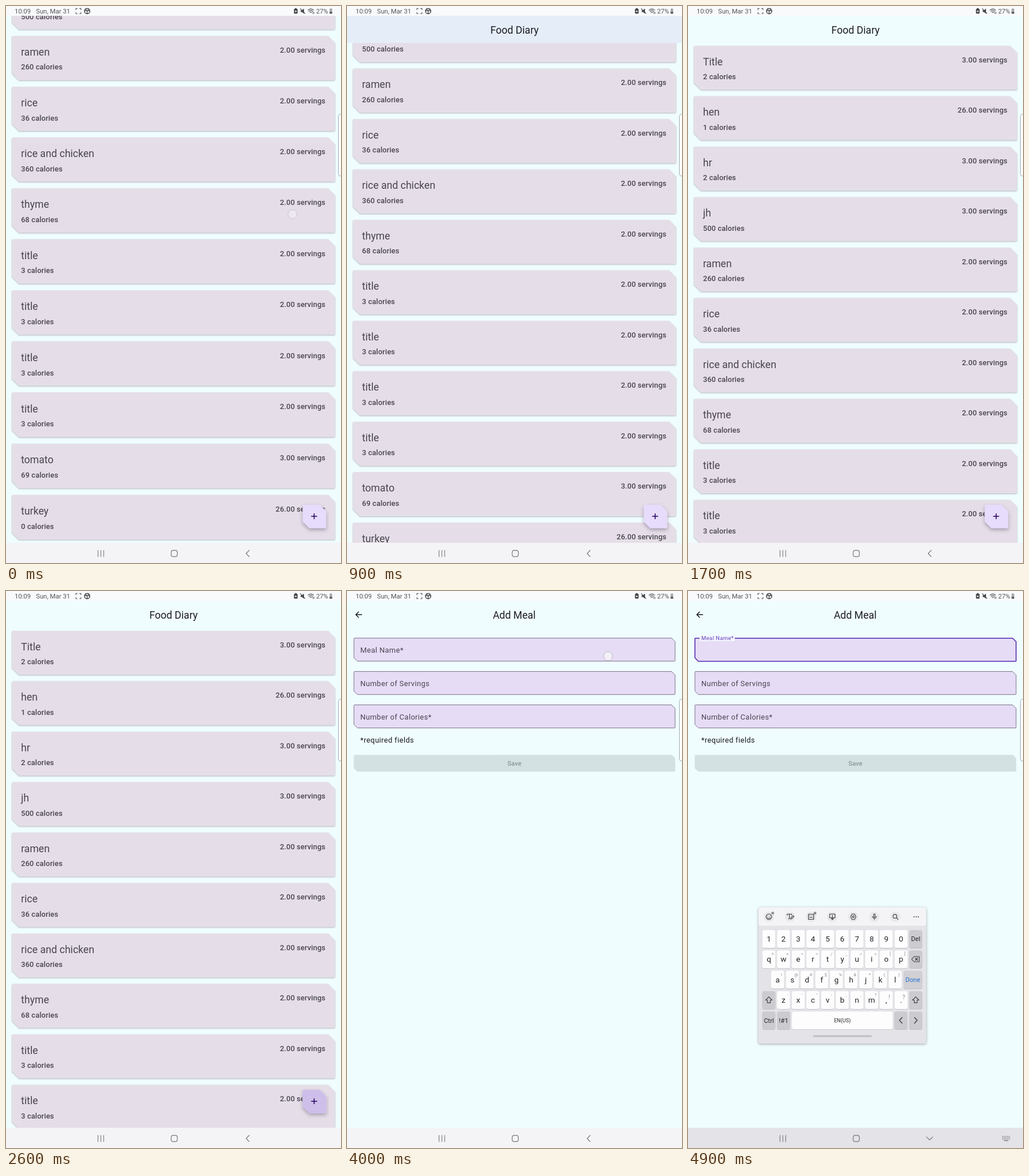
These frames come from a looping animation (580 px wide and 966 px high, 5100 ms). An HTML page:

```html
<!DOCTYPE html>
<html lang="en">
<head>
<meta charset="utf-8">
<title>Food diary</title>
<style>
  html, body { margin: 0; width: 100%; height: 100%; overflow: hidden; background: #f0fdff; }
  svg { display: block; width: 100vw; height: 100vh; }
  text { font-family: Roboto, "Noto Sans", sans-serif; white-space: pre; }
  .card { filter: drop-shadow(0 1px 1px rgba(40, 30, 50, .32)); }
  .fab { filter: drop-shadow(0 3px 3px rgba(40, 30, 60, .34)); }
  .panel { filter: drop-shadow(0 1px 2px rgba(0, 0, 0, .35)); }
  .line { fill: none; stroke-linecap: round; stroke-linejoin: round; }
</style>
</head>
<body>
<svg id="stage" viewBox="0 0 580 966" preserveAspectRatio="none"></svg>
<script>
const LOOP = 5100, STEP = 100;
const BAR = 17, HEAD = 46.7, FLOOR = 931, PITCH = 87.5, CARD = 76.3;
const INK = '#49454f', DARK = '#1b1b20', GREY = '#77777b', STATUS = '#55565a';
const stage = document.getElementById('stage');

function add(parent, tag, attrs = {}) {
  const el = document.createElementNS('http://www.w3.org/2000/svg', tag);
  set(el, attrs);
  parent.appendChild(el);
  return el;
}
function set(el, attrs) {
  for (const k in attrs) el.setAttribute(k, attrs[k]);
}
const group = (parent, attrs) => add(parent, 'g', attrs);
const rect = (parent, x, y, width, height, fill, rx = 0) =>
  add(parent, 'rect', { x, y, width, height, fill, rx });
const circle = (parent, cx, cy, r, fill, more = {}) =>
  add(parent, 'circle', { cx, cy, r, fill, ...more });
const line = (parent, d, stroke = GREY, width = 1.1) =>
  add(parent, 'path', { d, stroke, 'stroke-width': width, class: 'line' });

// y is the middle of the capitals
function label(parent, x, y, str, size, fill, more = {}) {
  const el = add(parent, 'text', { x, y: y + size * .355, 'font-size': size, fill, ...more });
  el.textContent = str;
  return el;
}

// box with the top right and bottom left corners cut off
function cutBox(x, y, w, h, c, r = 2) {
  const right = x + w, low = y + h;
  return `M${x + r} ${y}H${right - c}L${right} ${y + c}V${low - r}Q${right} ${low} ${right - r} ${low}` +
    `H${x + c}L${x} ${low - c}V${y + r}Q${x} ${y} ${x + r} ${y}Z`;
}

const MID = { 'text-anchor': 'middle' };
const MEDIUM = { 'font-weight': 500, 'letter-spacing': .12 };
const BODY = { 'letter-spacing': .4 };

rect(stage, 0, 0, 580, 966, '#f0fdff');

// ---- meal list ----
const meals = [
  ['Title', 2, 3], ['hen', 1, 26], ['hr', 2, 3], ['jh', 500, 3], ['ramen', 260, 2],
  ['rice', 36, 2], ['rice and chicken', 360, 2], ['thyme', 68, 2], ['title', 3, 2],
  ['title', 3, 2], ['title', 3, 2], ['title', 3, 2], ['tomato', 69, 3], ['turkey', 0, 26]
];
const listScreen = group(stage);
const cards = meals.map(([name, calories, servings]) => {
  const g = group(listScreen);
  add(g, 'path', { d: cutBox(10.3, 0, 559.4, CARD, 12), fill: '#e5dee8', class: 'card' });
  label(g, 26, 27.6, name, 17.6, INK);
  label(g, 26, 53.7, calories + ' calories', 12.8, INK, MEDIUM);
  label(g, 553, 24.2, servings.toFixed(2) + ' servings', 12.8, INK, { ...MEDIUM, 'text-anchor': 'end' });
  return g;
});

const header = group(listScreen);
rect(header, 0, BAR, 580, HEAD, '#f0fdff');
const tint = rect(header, 0, BAR, 580, HEAD, '#e5edf9');
label(header, 290, 41.3, 'Food Diary', 17.6, DARK, MID);

const fabShape = cutBox(513.7, 865, 40.8, 40.8, 11.5);
add(listScreen, 'path', { d: fabShape, fill: '#e8dcfc', class: 'fab' });
add(add(stage, 'clipPath', { id: 'fabClip' }), 'path', { d: fabShape });
const ripple = circle(group(listScreen, { 'clip-path': 'url(#fabClip)' }), 522, 873, 0, '#cdbfe9');
add(listScreen, 'path', { d: 'M528.4 885h10.2M533.5 879.9v10.2', stroke: '#22005d', 'stroke-width': 1.5 });

// ---- meal form ----
const form = group(stage);
line(form, 'M25.5 41H15.5M20 36.2L15.2 41L20 45.8', DARK, 1.5);
label(form, 289.5, 41.3, 'Add Meal', 17.6, DARK, MID);
const fieldShape = y => cutBox(12, y, 556, 40, 6, 1);
for (const y of [81.7, 139.6, 197.5])
  add(form, 'path', { d: fieldShape(y), fill: '#e6dcf6', stroke: '#7c7289', 'stroke-width': 1 });
const focus = add(form, 'path', { d: fieldShape(81.9), fill: 'none', stroke: '#6a45bd', 'stroke-width': 1.7 });
const notch = rect(form, 20, 77, 61, 10, '#f2f6fe');
const nameLabel = label(form, 23, 102, 'Meal Name*', 12.8, INK, BODY);
label(form, 23, 160, 'Number of Servings', 12.8, INK, BODY);
label(form, 23, 218, 'Number of Calories*', 12.8, INK, BODY);
label(form, 23, 258.5, '*required fields', 12.8, DARK, BODY);
add(form, 'path', { d: cutBox(11.7, 284.3, 556.6, 29, 6), fill: '#d3e1e2' });
label(form, 289.8, 299.2, 'Save', 11.2, '#8b9799', { ...MID, 'font-weight': 500 });

// ---- keyboard ----
const keyboard = group(stage);
function buildKeyboard(g) {
  const KEY = '#fdfdfe', MOD = '#cccbd0', TXT = '#252529', COL = 25.42;
  const colX = i => 140 + i * COL;
  function key(cx, cy, str, fill = KEY, w = 22.6, size = 13.5, color = TXT) {
    rect(g, cx - w / 2, cy - 14.6, w, 31, '#bdbcc2', 3.5);
    rect(g, cx - w / 2, cy - 15.4, w, 31, fill, 3.5);
    if (str) label(g, cx, cy, str, size, color, MID);
  }
  function row(first, cy, keys, marks = []) {
    [...keys].forEach((ch, i) => {
      key(colX(first + i), cy, ch);
      if (marks[i]) label(g, colX(first + i) + 6.8, cy - 9, marks[i], 7.5, '#8d8d92', MID);
    });
  }
  add(g, 'rect', { x: 122, y: 548.5, width: 290.5, height: 236.5, rx: 4, fill: '#e4e3e7', class: 'panel' });
  rect(g, 122, 548.5, 290.5, 32, '#f4f3f6', 4);

  for (let i = 0; i < 7; i++) circle(g, 140 + i * 36.5, 565, 9, '#e8e7ea');
  const icon = (d, w = 1.1) => line(g, d, '#3c3c40', w);
  const ring = (x, y, r) => circle(g, x, y, r, 'none', { stroke: '#3c3c40', 'stroke-width': 1.1 });
  ring(140, 565, 4.8);
  icon('M138.2 563.5v.1M141.8 563.5v.1M137.5 566.3Q140 569.8 142.5 566.3');
  icon('M171.5 562v-1.5h8v1.5M175.5 560.5v8h-1.5M177.5 569l.6-2.3 3.6-3.6 1.6 1.6-3.6 3.6z');
  icon('M208.6 560.5h9v9h-9zM211 563v.6M215 563v.6M210.8 566.2h4.6');
  icon('M245.3 560.3h9.2v6.4h-9.2zM250 562v7.6M248 567.8l2 2 2-2');
  icon('M284 560.3h4.4l2.4 4.7-2.4 4.7H284l-2.4-4.7z');
  ring(286.2, 565, 1.6);
  icon('M321.4 561.4a1.3 1.3 0 0 1 2.6 0v3a1.3 1.3 0 0 1-2.6 0zM319.3 564.5q.4 3 3.4 3t3.4-3M322.7 567.5v2.3');
  ring(358.3, 564.2, 3.3);
  icon('M360.8 566.7l2.8 2.8');
  [391.3, 395, 398.7].forEach(x => circle(g, x, 565, .95, '#3c3c40'));
  [146.7, 220].forEach(x => circle(g, x, 558.7, 2.4, '#8c8c90'));

  row(0, 603.5, '1234567890');
  row(0, 638.6, 'qwertyuiop', '+×÷=/_<>[]');
  row(.6, 674, 'asdfghjkl', '!@#$%^&*()'.replace('^', ''));
  row(1, 709.3, 'zxcvbnm', '-\'":;,?');
  key(colX(8), 709.3, ',');
  label(g, 348.5, 704, '!', 10, '#8d8d92', MID);
  key(colX(9), 709.3, '.');
  label(g, 373.5, 704, '?', 10, '#8d8d92', MID);

  key(394.2, 603.5, 'Del', MOD, 22.6, 11.2);
  key(394.2, 638.6, '', MOD);
  icon('M391.3 634h9v9h-9l-4-4.5zM393.6 636.5l4 4M397.6 636.5l-4 4');
  key(389.3, 674, 'Done', '#d1d0d5', 32.4, 11.2, '#2272d2');
  for (const x of [140, 394.2]) {
    key(x, 709.3, '', MOD);
    icon(`M${x} 703.8l5.5 5.7h-2.9v4.6h-5.2v-4.6h-2.9z`);
  }
  key(140, 744.7, 'Ctrl', MOD, 22.6, 11);
  key(165.6, 744.7, '!#1', MOD, 22.6, 11.5);
  key(267.2, 744.7, 'EN(US)', KEY, 174.5, 9);
  key(368.7, 744.7, '', MOD);
  key(394.2, 744.7, '', MOD);
  icon('M370.7 739.8l-4.6 4.8 4.6 4.8M392.2 739.8l4.6 4.8-4.6 4.8', 1.4);
  rect(g, 216.5, 770.6, 102, 3, '#bfbec3', 1.5);
}
buildKeyboard(keyboard);

// ---- system bars ----
rect(stage, 0, 0, 580, BAR, '#f9fafb');
label(stage, 15, 9, '10:09', 11.2, STATUS);
label(stage, 52, 9, 'Sun, Mar 31', 11.2, STATUS);
line(stage, 'M121 6.6V4.4h2.2M127.6 4.4h2.2v2.2M129.8 11v2.2h-2.2M123.2 13.2H121V11', STATUS);
const recorder = group(stage);
line(recorder, 'M122.8 7h3.6v3.8h-3.6zM126.8 8.6l1.6-1v2.8l-1.6-1', STATUS, 1.1);
circle(stage, 140.5, 8.8, 4.6, 'none', { stroke: '#444549', 'stroke-width': 1.5 });
line(stage, 'M136.4 8.2h8.2M140.5 8.6v4.4M138 4.8l1.2 3M143 4.8l-1.2 3', '#444549', 1.2);

rect(stage, 498.6, 5, 6.2, 8.3, '#45464a', 1.2);
rect(stage, 500.2, 3.8, 3, 2, '#45464a', .5);
circle(stage, 501.7, 9.2, 1.3, '#f9fafb');
add(stage, 'path', { d: 'M510.3 7.2h2.2l3.4-2.6v8.6l-3.4-2.6h-2.2z', fill: '#45464a' });
line(stage, 'M509.6 4.6l8 8.2', '#45464a', 1.2);
line(stage, 'M522.8 7.2q5-4.2 10 0M524.5 9.2q3.3-2.7 6.6 0M526.3 11.2q1.5-1.2 3 0', STATUS, 1.1);
line(stage, 'M531.4 10.5v2.8M533.3 10.5v2.8', STATUS, .9);
label(stage, 537, 9, '27%', 11.2, STATUS);
rect(stage, 560.2, 5, 4.6, 8.3, '#a9a9ad', 1);
rect(stage, 561.3, 4, 2.4, 1.4, '#a9a9ad');
rect(stage, 560.2, 10.2, 4.6, 3.1, '#55565a', 1);

rect(stage, 0, FLOOR, 580, 35, '#f4f3f6');
const navShade = rect(stage, 0, FLOOR, 580, 35, '#e4e3e7');
line(stage, 'M159.3 944v11M164.2 944v11M169.1 944v11');
add(stage, 'rect', { x: 286, y: 944.2, width: 10.6, height: 10.6, rx: 3.4, fill: 'none', stroke: GREY, 'stroke-width': 1.2 });
const back = line(stage, 'M421 944l-5.2 5.5 5.2 5.5');
const hide = line(stage, 'M412.8 946.8l5.5 5.2 5.5-5.2');
const keysIcon = group(stage);
for (let r = 0; r < 3; r++)
  for (let c = 0; c < 6; c++) rect(keysIcon, 544 + c * 2.4, 945.2 + r * 2.4, 1.3, 1.3, GREY);
rect(keysIcon, 547, 952.6, 7.5, 1.3, GREY);

add(stage, 'rect', { x: 575.5, y: 187.5, width: 12, height: 107.5, rx: 4, fill: '#fbfdfe', stroke: '#a4adb2', 'stroke-width': 1 });

const pointer = circle(stage, 0, 0, 7.8, '#f3f0f7', { stroke: '#b9b5c8', 'stroke-width': 1 });

// ---- motion: [time, value] keys, linear between them ----
const tracks = {
  stretch: [[0, -16.9], [100, -9], [200, -3], [300, 0], [1300, 0], [1400, 18.3], [1500, 9], [1600, 3], [1700, 0]],
  head: [[600, 0], [700, 12], [800, 35], [900, HEAD]],
  scroll: [[1000, 310.4], [1100, 255], [1200, 120], [1300, 120], [1400, 0]],
  tint: [[1400, 1], [1700, 0]],
  ripple: [[1900, 0], [2400, 48]],
  press: [[1900, .7], [2400, 1], [2700, 1], [2800, .5], [2900, 0]],
  page: [[3000, 0], [3100, .08], [3200, .4], [3300, .74], [3400, .94], [3500, .94], [3600, 1]],
  focus: [[4100, 0], [4200, .4], [4300, .9], [4400, 1]],
  keyboard: [[4500, 0], [4600, .35], [4700, .7], [4800, .92], [4900, 1]]
};
// from, until, x, y, speed x, speed y, opacity
const touches = [
  [0, 100, 496, 361, 0, 0, .6],
  [600, 800, 462, 503, .02, .17, 1],
  [1100, 1300, 464, 420, .04, 1.3, 1],
  [2000, 2600, 522, 873, 0, 0, 1],
  [4000, 4200, 452, 113, 0, 0, 1]
];

function at(keys, t) {
  const i = keys.findIndex(k => k[0] > t);
  if (i === 0) return keys[0][1];
  if (i < 0) return keys[keys.length - 1][1];
  const [t0, a] = keys[i - 1], [t1, b] = keys[i];
  return a + (b - a) * (t - t0) / (t1 - t0);
}

// overscroll: content pulls away from the edge it is pinned to
function pull(y, top, k) {
  const u = Math.max(0, (k > 0 ? y - top : FLOOR - y) / (FLOOR - top));
  return y + k * u * (1 - .4 * u);
}

const show = (el, opacity) => set(el, { opacity });

function draw(t) {
  const v = {};
  for (const name in tracks) v[name] = at(tracks[name], t);

  const top = BAR + v.head;
  cards.forEach((card, i) => {
    const y = top + 5.3 + i * PITCH - v.scroll;
    const y0 = pull(y, top, v.stretch), y1 = pull(y + CARD, top, v.stretch);
    set(card, { transform: `translate(0 ${y0}) scale(1 ${(y1 - y0) / CARD})` });
  });
  set(header, { transform: `translate(0 ${v.head - HEAD})` });
  show(tint, v.tint);
  set(ripple, { r: v.ripple, opacity: v.press });

  show(listScreen, 1 - v.page);
  show(form, v.page);

  const f = v.focus, size = 12.8 - 3.2 * f;
  show(focus, f);
  show(notch, f);
  set(nameLabel, {
    y: 102 - 20 * f + size * .355,
    'font-size': size,
    'letter-spacing': .4 - .08 * f,
    fill: f > .5 ? '#6a45bd' : INK
  });

  const typing = t >= 4500;
  show(back, typing ? 0 : 1);
  show(hide, typing ? 1 : 0);
  show(keysIcon, typing ? 1 : 0);
  show(keyboard, v.keyboard);
  show(navShade, v.keyboard);
  show(recorder, t % 1000 >= 100 && t % 1000 < 600 ? 1 : 0);

  const touch = touches.find(p => t >= p[0] && t < p[1]);
  show(pointer, touch ? touch[6] : 0);
  if (touch) {
    const [from, , x, y, vx, vy] = touch;
    set(pointer, { cx: x + vx * (t - from), cy: y + vy * (t - from) });
  }
}

const start = performance.now();
let last = -1;
function tick() {
  const t = Math.floor(((performance.now() - start) % LOOP) / STEP) * STEP;
  if (t !== last) draw(last = t);
  requestAnimationFrame(tick);
}
tick();
</script>
</body>
</html>
```
